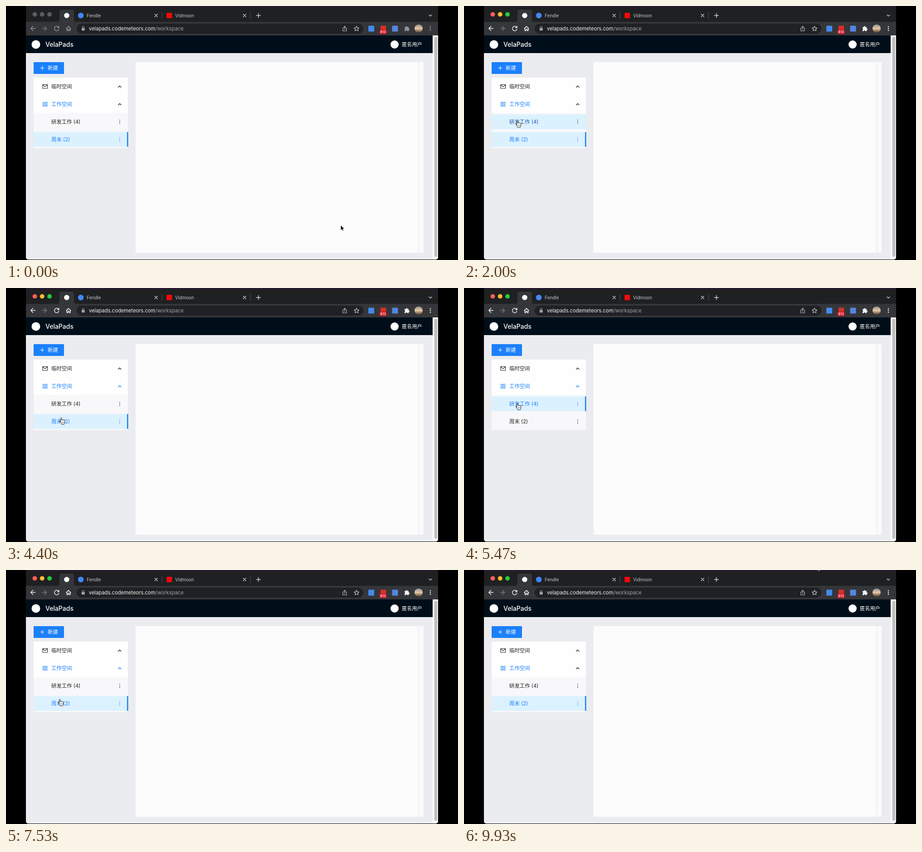
Recreate the animation shown at these times as an HTML page. Size 998x561 px, loop 9.99 s.

```html
<!DOCTYPE html>
<html lang="zh-CN">
<head>
<meta charset="utf-8">
<title>Workspace tabs</title>
<style>
html, body { margin: 0; width: 100%; height: 100%; overflow: hidden; background: #000; }
svg { display: block; width: 100%; height: 100%; }
text { font-family: Inter, "Noto Sans CJK SC", "Noto Sans CJK", sans-serif; font-size: 11.4px; white-space: pre; }
.tab text { font-size: 9.9px; fill: #c4c7cb; }
.line { fill: none; stroke-linecap: round; stroke-linejoin: round; }
</style>
</head>
<body>
<svg id="stage" viewBox="0 0 998 561">
  <defs>
    <linearGradient id="fade" gradientUnits="userSpaceOnUse" x1="636" x2="656" y1="0" y2="0">
      <stop offset="0" stop-color="#c4c7cb"/><stop offset="1" stop-color="#c4c7cb" stop-opacity="0"/>
    </linearGradient>
    <linearGradient id="sunset" x1="0" x2="0" y1="0" y2="1">
      <stop offset="0" stop-color="#8b8f96"/><stop offset=".5" stop-color="#e8c9a0"/><stop offset="1" stop-color="#5a4032"/>
    </linearGradient>
    <clipPath id="frame"><rect x="44" y="-8" width="910" height="568" rx="5"/></clipPath>
  </defs>
  <rect width="998" height="561"/>
  <g clip-path="url(#frame)">
    <rect x="44" width="910" height="561" fill="#1f2022"/>
    <rect x="44" width="910" height="1.2" fill="#34184a"/>
    <path d="M113 35q5 0 5-5V13q0-5 5-5h22q5 0 5 5v17q0 5 5 5Z" fill="#35363a"/>
    <rect x="44" y="35" width="910" height="30" fill="#35363a"/>
    <rect x="156" y="39" width="633" height="22" rx="11" fill="#202124"/>
    <circle cx="134" cy="21" r="5.8" fill="#fff"/>
    <g id="lights"></g>
    <g id="tabs"></g>
    <path class="line" d="M934 19.5l3 3 3-3" stroke="#c4c7cb" stroke-width="1.4"/>

    <g class="line" stroke-width="1.5">
      <g class="tool"><path d="M64.5 49.5h-9.5m4.5-4.7l-4.7 4.7 4.7 4.7"/>
        <path d="M116 46.8a5 5 0 1 0 .7 4.5m.2-6.6v3.2h-3.2"/>
        <path d="M133 49.7l5-4.6 5 4.6m-8.6-.7v5.5h2.4v-3.2h2.6v3.2h2.4v-5.5"/></g>
      <path d="M80 49.5h9.5m-4.5-4.7l4.7 4.7-4.7 4.7" stroke="#77797d"/>
      <path d="M745.5 48.5h-1.8v6.5h8.2v-6.5h-1.8m-2.3 3.5v-7.3m-2 2l2-2 2 2" stroke="#c4c7cb" stroke-width="1.1"/>
      <path d="M774 44.6l1.6 3.5 3.8.4-2.8 2.6.8 3.8-3.4-2-3.4 2 .8-3.8-2.8-2.6 3.8-.4Z" stroke="#d4d6d9" stroke-width="1.1"/>
    </g>
    <rect x="167" y="48.5" width="6.8" height="5.7" rx=".8" fill="#a0a4a9"/>
    <path class="line" d="M168.5 48.5v-1.6a1.9 1.9 0 0 1 3.8 0v1.6" stroke="#a0a4a9" stroke-width="1.1"/>
    <text x="183" y="53.6" style="font-size:11.2px" fill="#f1f2f4">velapads.codemeteors.com<tspan fill="#a0a4a9">/workspace</tspan></text>
    <rect x="800" y="43.5" width="13" height="13" rx="1.5" fill="#438bea"/>
    <rect x="827" y="43.5" width="12" height="10" fill="#d93025"/>
    <rect x="824.5" y="52" width="16" height="10" rx="1.5" fill="#cf1322"/>
    <text x="832.5" y="59.8" text-anchor="middle" style="font-size:7.6px;font-weight:500" fill="#fff">813</text>
    <rect x="852.5" y="43.5" width="13" height="13" rx="1.5" fill="#5585e0"/>
    <path id="puzzle" d="M880 46.5h2.8a1.9 1.9 0 0 1 3.8 0h2.5v3a1.9 1.9 0 0 1 0 3.8v2.2h-3a1.8 1.8 0 0 0-3.5 0H880v-2.9a1.8 1.8 0 0 0 0-3.4Z"/>
    <circle cx="911" cy="49.7" r="9" fill="url(#sunset)"/>
    <g id="more"></g>

    <rect x="44" y="65" width="898" height="39" fill="#000e1a"/>
    <rect x="44" y="104" width="898" height="457" fill="#ebecef"/>
    <rect x="942" y="65" width="12" height="496" fill="#fafafa"/>
    <rect x="945.7" y="68" width="6.6" height="486" rx="3.3" fill="#bfbfc0"/>
    <circle cx="66" cy="85" r="9.5" fill="#fff"/>
    <circle cx="858" cy="85" r="9" fill="#fff"/>
    <text x="87" y="90" style="font-size:14px;font-weight:500" fill="#fff">VelaPads</text>
    <text x="874" y="89" style="font-size:11.2px" fill="#fff">匿名用户</text>

    <rect x="286" y="124" width="636" height="421" fill="#fcfcfd"/>
    <rect x="911" y="124" width="11" height="421" fill="#fafafa"/>
    <rect x="910.6" y="124" width="1" height="421" fill="#e4e4e4"/>

    <rect x="61" y="124" width="67" height="26" rx="1" fill="#1b80fb"/>
    <path d="M75.5 137h9m-4.5-4.5v9" stroke="#fff" stroke-width="1.1"/>
    <text x="92" y="141.3" fill="#fff">新建</text>

    <rect x="61" y="158" width="208" height="156" fill="#fefefe"/>
    <rect x="61" y="236" width="208" height="78" fill="#f8f8fa"/>
    <path class="line" d="M81 173.5h10.5v8.5H81Zm0 .6l5.2 4.2 5.3-4.2" stroke="#222" stroke-width="1.1"/>
    <text x="100" y="181.7" fill="#222">临时空间</text>
    <path class="line" d="M248 179.6l3-3 3 3" stroke="#222" stroke-width="1.4"/>
    <path class="line" d="M82 212.5h3.4v3.4H82Zm5.6 0h3.4v3.4h-3.4ZM82 218h3.4v3.4H82Zm5.6 0h3.4v3.4h-3.4Z" stroke="#1b80fb"/>
    <text x="100" y="220.7" fill="#1b80fb">工作空间</text>
    <path id="fold" class="line" d="M248 218.6l3-3 3 3" stroke-width="1.4"/>
    <g id="items"></g>
  </g>
  <path id="arrow" d="M0 0V11.3L2.6 9 4.3 13 6.3 12.2 4.6 8.3H8Z" fill="#000" stroke="#fff" stroke-width=".8"/>
  <g id="hand" fill="#fff" stroke="#000" stroke-width=".9" stroke-linejoin="round">
    <path d="M-1.4 8.5V.7Q-1.4-.5-.3-.5T.9.7V5q0-1.1 1.1-1.1T3.2 5q0-.9 1.1-.9t1.2 1.1q0-.8 1-.8t1.2 1.3V9q0 2.2-1.3 3.6V14H.4v-1.2Q-1.3 11.2-2.7 8.8-4 6.8-3.2 6.3-2.2 5.9-1.4 7.5Z"/>
    <path d="M1.2 8.3v2.7M3.2 8.3v2.7M5.2 8.3v2.7" stroke-width=".6"/>
  </g>
</svg>
<script>
const LOOP = 9990, ACTIVE = 1870;
const BLUE = [27, 128, 251], DARK = [34, 34, 34];
const $ = id => document.getElementById(id);

function add(parent, tag, attrs, text) {
  const el = document.createElementNS("http://www.w3.org/2000/svg", tag);
  for (const k in attrs) el.setAttribute(k, attrs[k]);
  if (text) el.textContent = text;
  return parent.appendChild(el);
}
const show = (el, on) => el.setAttribute("visibility", on ? "visible" : "hidden");
const clamp = v => Math.max(0, Math.min(1, v));
const mix = (a, b, p) => `rgb(${a.map((v, i) => Math.round(v + (b[i] - v) * p))})`;

// Tab strips: title, icon shape, icon colour
function strip(list, pitch) {
  const g = add($("tabs"), "g", { class: "tab" });
  list.forEach(([title, shape, color], i) => {
    const x = 165.2 + i * pitch;
    if (shape === "circle") add(g, "circle", { cx: x, cy: 21, r: 6.3, fill: color });
    else add(g, "rect", { x: x - 6, y: 15, width: 12, height: 12, rx: 1.5, fill: color });
    const label = add(g, "text", { x: x + 13, y: 24.6 }, title);
    if (title.startsWith("JSON")) label.style.fill = "url(#fade)";
    const end = x + pitch - 16.5;
    add(g, "path", { class: "line", d: `M${end - 15.5} 18l6 6m0-6l-6 6`, stroke: "#d0d2d5", "stroke-width": 1.3 });
    add(g, "path", { d: `M${end + .5} 13.5v15`, stroke: "#505256" });
  });
  const px = 165.2 + list.length * pitch + 1.6;
  add(g, "path", { class: "line", d: `M${px - 4.5} 21h9m-4.5-4.5v9`, stroke: "#d0d2d5", "stroke-width": 1.5 });
  return g;
}
const weekend = strip([["Fendle", "circle", "#4285f4"], ["Vidmoon", "square", "#f00a0a"]], 195.3);
const work = strip([
  ["问禾一下，你就明白", "square", "#2f4fd8"],
  ["云岚辞书", "circle", "#e01b22"],
  ["JSON在线解析及格式化验证", "square", "#13a84c"],
  ["组件总览 - Ant Design", "circle", "#1c7df0"]
], 176.6);

const lights = ["#ff5f57", "#febc2e", "#28c840"].map((color, i) =>
  ({ color, el: add($("lights"), "circle", { cx: 63.5 + i * 16.3, cy: 18.5, r: 5 }) }));
for (const y of [45.7, 49.7, 53.7]) add($("more"), "circle", { cx: 937, cy: y, r: 1.3 });

const items = ["研发工作 (4)", "周末 (2)"].map((name, i) => {
  const g = $("items"), y = 255.7 + i * 39;
  const back = add(g, "rect", { x: 61, y: y - 16.3, width: 208, height: 32.6, fill: "#dcf1fe" });
  const bar = add(g, "rect", { x: 267.2, y: y - 16.3, width: 2.6, height: 32.6, fill: "#1b80fb" });
  const label = add(g, "text", { x: 100, y: y + 4.2 }, name);
  const dots = add(g, "g", {});
  for (const d of [-3.7, 0, 3.7]) add(dots, "circle", { cx: 251, cy: y + d, r: .85 });
  return { back, bar, label, dots };
});

// Pointer stops: time, x, y
const path = [
  [0, 739, 484], [1670, 118, 254], [2780, 118, 254], [3000, 121, 283], [3300, 122, 287],
  [4650, 122, 287], [5000, 118, 255], [6500, 118, 255], [6730, 119, 286], [7550, 119, 286],
  [8400, 133, 379], [8600, 133, 380], [8970, 133, 380], [9930, 779, -11], [LOOP, 779, -11]
];
function pointer(t) {
  const i = path.findIndex((p, n) => n && t <= p[0]);
  const [t0, x0, y0] = path[i - 1], [t1, x1, y1] = path[i];
  const p = clamp((t - t0) / (t1 - t0)), e = p * p * (3 - 2 * p);
  return [x0 + (x1 - x0) * e, y0 + (y1 - y0) * e];
}

// Menu clicks: press, selection, tab swap, item index
const clicks = [[1900, 2130, 2400, 0], [3400, 3530, 3830, 1], [5140, 5270, 5550, 0], [6940, 7070, 7400, 1]];
const latest = (t, col) => clicks.reduce((now, c) => t >= c[col] ? c[3] : now, 1);
// Hover spans per item
const hovers = [[[1870, 2860], [4840, 6600]], [[2900, 4780], [6600, 7830]]];
const hoverMix = (t, spans) => Math.max(...spans.map(([a, b]) => Math.min(clamp((t - a) / 220), 1 - clamp((t - b) / 250))));

function draw(t) {
  const active = t >= ACTIVE;
  lights.forEach(l => l.el.setAttribute("fill", active ? l.color : "#5b5d61"));
  const tone = active ? "#f1f2f4" : "#919397";
  document.querySelector(".tool").setAttribute("stroke", tone);
  $("puzzle").setAttribute("fill", tone);
  $("more").setAttribute("fill", tone);

  const onWork = latest(t, 2) === 0;
  show(work, onWork);
  show(weekend, !onWork);

  const chosen = latest(t, 1);
  items.forEach((it, i) => {
    const on = i === chosen;
    const pressed = clicks.some(c => c[3] === i && t >= c[0] && t < c[1]);
    show(it.back, on || pressed);
    show(it.bar, on);
    it.label.setAttribute("fill", mix(DARK, BLUE, on ? 1 : hoverMix(t, hovers[i])));
    it.dots.setAttribute("fill", mix(DARK, BLUE, on ? 1 : 0));
  });
  $("fold").setAttribute("stroke", mix(DARK, BLUE, hoverMix(t, [[2000, 7830]])));

  const [x, y] = pointer(t);
  const over = active && x > 61 && x < 269 && y > 158 && y < 314;
  show($("hand"), over);
  show($("arrow"), !over);
  $(over ? "hand" : "arrow").setAttribute("transform", `translate(${x} ${y})`);
}

const start = performance.now();
function tick() {
  draw((performance.now() - start) % LOOP);
  requestAnimationFrame(tick);
}
draw(0);
requestAnimationFrame(tick);
</script>
</body>
</html>
```
